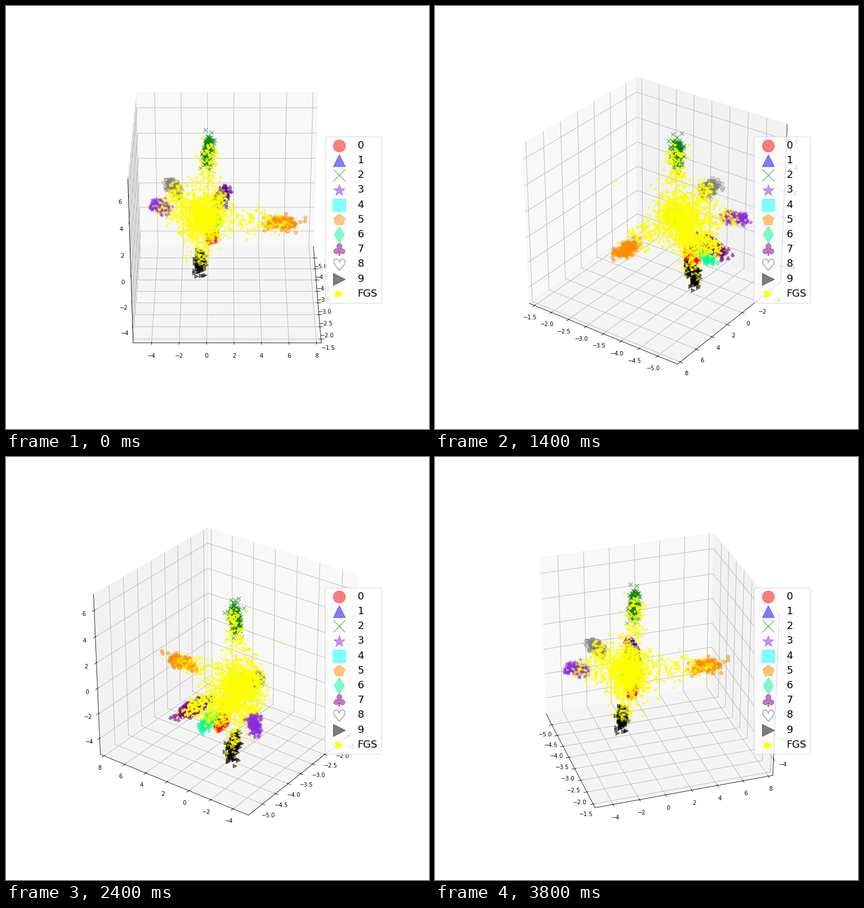
A matplotlib script for the animation above (4 s loop, 748 by 748 pixels).

```python
import numpy as np
import matplotlib.pyplot as plt
from matplotlib.animation import FuncAnimation

SIZE, DPI = 748, 72
FRAMES, INTERVAL = 20, 200
PER_CLUSTER, PER_ARM = 160, 190

# Marker, colour and centre of each class
CLASSES = [
    ("o", "red", (-4.17, 0.32, -1.94)),
    ("^", "blue", (-4.75, 1.0, -0.05)),
    ("x", "green", (-3.72, 0.12, 5.42)),
    ("*", "blueviolet", (-4.58, -3.63, -0.35)),
    ("s", "cyan", (-3.6, 0.0, 0.45)),
    ("p", "darkorange", (-3.53, 5.58, 0.15)),
    ("d", "mediumspringgreen", (-4.57, 0.45, -1.34)),
    (r"$\clubsuit$", "purple", (-5.02, 1.17, -0.14)),
    (r"$\heartsuit$", "gray", (-4.07, -2.5, 2.0)),
    (">", "black", (-4.05, -0.53, -3.9)),
]
HUB = np.array([-3.64, -0.34, 0.34])
STRAYS = [(-1.64, -1.39, 0.62), (-1.91, 0.06, 1.18)]
rng = np.random.default_rng(7)


def gauss(n, dims, limit=2.5):
    return rng.normal(size=(n, dims)).clip(-limit, limit)


def cluster(center):
    """A blob stretched along the line from the hub."""
    stretch = 0.1 * gauss(PER_CLUSTER, 1) * (center - HUB)
    return center + stretch + gauss(PER_CLUSTER, 3) * (0.08, 0.18, 0.2)


def arm(center):
    """Points running from the hub to a blob, narrowing on the way."""
    t = 1.05 * rng.beta(0.8, 0.9, (PER_ARM, 1))
    noise = gauss(PER_ARM, 3) * (0.28, 0.8, 0.8)
    return HUB + t * (center - HUB) + noise * (1 - 0.65 * t)


fig = plt.figure(figsize=((SIZE + 1e-6) / DPI,) * 2, dpi=DPI, facecolor="white")
ax = fig.add_subplot(projection="3d")
ax.set_position([0.125, 0.11, 0.775, 0.77])
ax.apply_aspect = lambda position=None: None  # fill the slot, not a square
ax.set_box_aspect((1, 1, 1), zoom=3 ** 0.5 / 1.8294640721620434)

centers = np.array([c for _, _, c in CLASSES])
for label, (marker, color, _) in enumerate(CLASSES):
    ax.scatter(*cluster(centers[label]).T, s=50, c=color, marker=marker,
               alpha=0.5, label=str(label))

cloud = np.vstack([arm(c) for c in centers] + [STRAYS])
ax.scatter(*cloud.T, s=20, c="yellow", marker=">", label="FGS")

ax.set(xlim=(-5.537, -1.346), ylim=(-5.35, 8.355), zlim=(-5.313, 7.2),
       xticks=np.arange(-5, -1, 0.5), yticks=range(-4, 9, 2),
       zticks=range(-4, 7, 2))
ax.tick_params(pad=4)
legend = ax.legend(loc="center right", fontsize=18, labelspacing=0.455,
                   markerscale=3, scatterpoints=1)
legend.set_zorder(100)


def update(i):
    # A tiny nudge settles which side wall shows in edge-on views.
    ax.view_init(elev=30, azim=360 / FRAMES * i + (-0.01 if i else 0.01))
    return []


anim = FuncAnimation(fig, update, frames=FRAMES, interval=INTERVAL,
                     init_func=lambda: update(0), repeat=True, repeat_delay=0)
plt.show()
```
